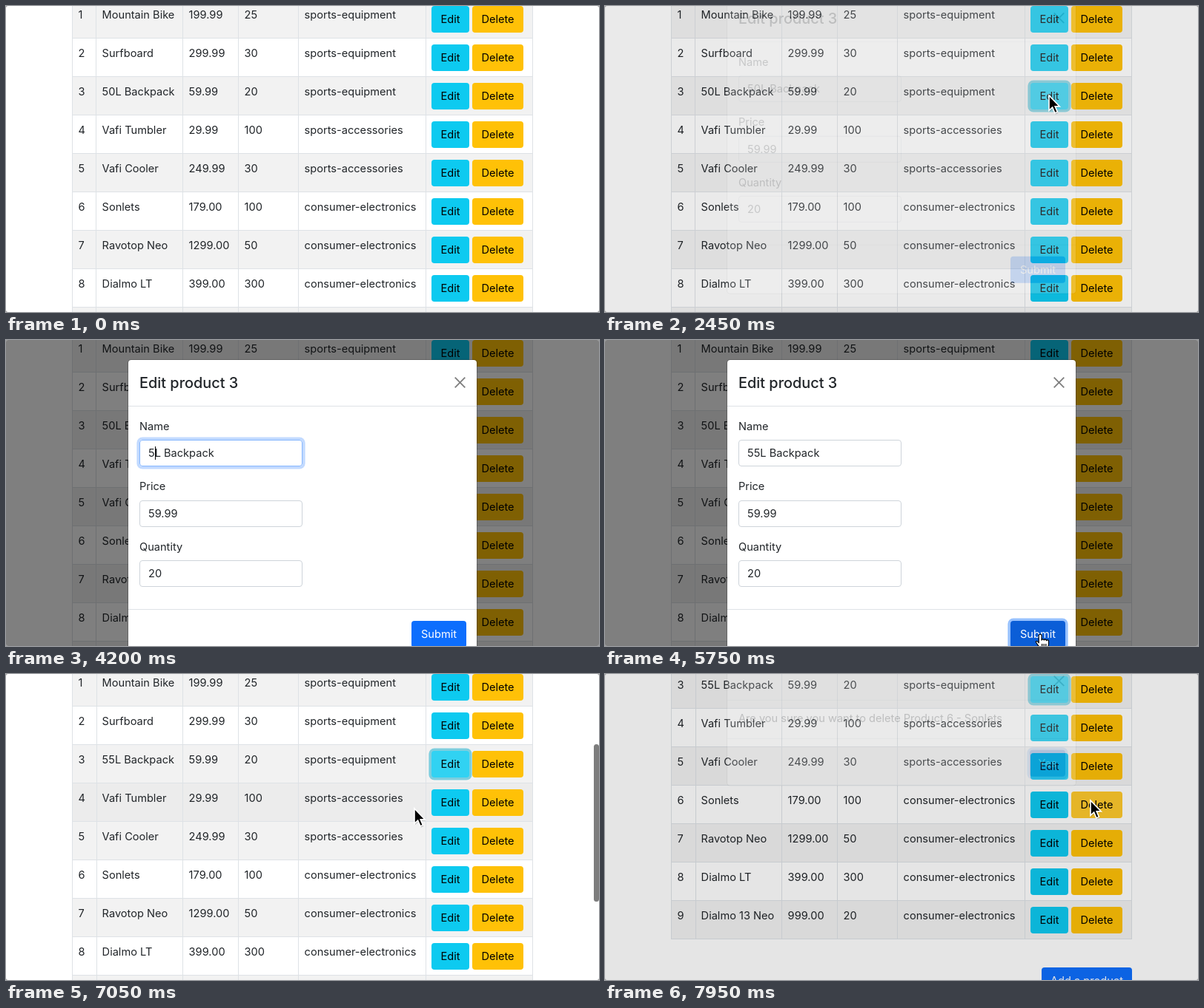
An HTML page for the animation above (8000 ms loop, 800 by 414 pixels).

```html
<!DOCTYPE html>
<html lang="en">
<head>
<meta charset="utf-8">
<title>Product table</title>
<style>
  html, body { margin: 0; width: 100%; height: 100%; overflow: hidden; background: #999; }
  * { box-sizing: border-box; }
  #stage {
    position: relative; width: 800px; height: 414px; overflow: hidden;
    background: #fff; color: #212529; border-radius: 3px;
    font: 14.6px/20px Inter, Roboto, sans-serif; white-space: nowrap;
  }
  #stage div, svg { position: absolute; }
  #page { left: 0; top: 0; width: 800px; height: 600px; --first: 32px; }
  #rows { left: 0; top: 0; }

  #page .row {
    left: 89px; width: 622px; height: 52px; display: grid;
    grid-template-columns: var(--first) calc(149px - var(--first)) 75px 81px 172px 145px;
    border-bottom: 1px solid #dee2e6; line-height: 40px;
  }
  .row:nth-child(odd) { background: #f2f2f2; }
  #page .row.hover { background: #ececec; }
  .row span { border-left: 1px solid #dee2e6; padding-left: 7.6px; }
  .row span:nth-child(2) { padding-left: calc(39.6px - var(--first)); }
  .row span:nth-child(6) { border-right: 1px solid #dee2e6; }

  .btn { height: 36px; border-radius: 4px; text-align: center; line-height: 36px; color: #000; }
  .edit { left: 485px; top: 8px; width: 51px; background: #0dcaf0; }
  .edit.hover, .edit.focus { background: #31d2f2; }
  .edit.focus { box-shadow: 0 0 0 3.6px rgba(11, 172, 204, .5); }
  .delete { left: 540px; top: 8px; width: 69px; background: #ffc107; }
  .delete.hover { background: #ffca2c; }
  .primary { background: #0d6efd; color: #fff; }
  .primary.hover, .primary.focus { background: #0b5ed7; }
  .primary.focus { box-shadow: 0 0 0 3.6px rgba(49, 132, 253, .5); }
  #add { left: 589px; top: 498px; width: 122px; }

  #thumb { left: 793px; width: 7px; height: 213px; border-radius: 4px; background: #7d7d7d; }
  #shade { inset: 0; background: #000; }
  .dialog {
    left: 164px; width: 472px; background: #fff; background-clip: padding-box;
    border: 1px solid rgba(0, 0, 0, .2); border-radius: 5px;
  }
  #editor { top: 26px; height: 405px; }
  #confirm { top: 23px; height: 169px; }
  .line { left: 0; right: 0; height: 1px; background: #dee2e6; }
  .title { left: 15px; top: 16px; font-size: 19.9px; font-weight: 500; line-height: 30px; }
  .label { left: 15px; }
  .input {
    left: 15px; width: 220px; height: 36px; padding-left: 11px; line-height: 34px;
    border: 1px solid #ced4da; border-radius: 4px;
  }
  .close { left: 440px; width: 15px; height: 15px; stroke: #000; stroke-width: 1.8; opacity: .5; }
  #caret { display: inline-block; width: 1px; height: 18px; margin-right: -1px; vertical-align: -4px; background: #000; }
  #pointer { left: 0; top: 0; width: 30px; height: 34px; overflow: visible; }
</style>
</head>
<body>
<div id="stage">
  <div id="page">
    <div id="rows"></div>
    <div id="add" class="btn primary">Add a product</div>
  </div>
  <div id="thumb"></div>
  <div id="shade"></div>

  <div id="editor" class="dialog">
    <div class="title">Edit product 3</div>
    <svg class="close" style="top:23px" viewBox="0 0 15 15"><path d="M.7 .7L14.3 14.3M14.3 .7L.7 14.3"/></svg>
    <div class="line" style="top:62px"></div>
    <div class="label" style="top:80px">Name</div>
    <div id="name" class="input" style="top:108px"><span id="typed">50</span><i id="caret"></i>L Backpack</div>
    <div class="label" style="top:161px">Price</div>
    <div class="input" style="top:189.5px">59.99</div>
    <div class="label" style="top:242.5px">Quantity</div>
    <div class="input" style="top:271px">20</div>
    <div class="line" style="top:337px"></div>
    <div id="submit" class="btn primary" style="left:382px; top:353px; width:74px">Submit</div>
  </div>

  <div id="confirm" class="dialog">
    <svg class="close" style="top:18px" viewBox="0 0 15 15"><path d="M.7 .7L14.3 14.3M14.3 .7L.7 14.3"/></svg>
    <div class="line" style="top:51px"></div>
    <div class="label" style="top:66px">Are you sure you want to delete Product 6 - Sonlets</div>
    <div class="line" style="top:103px"></div>
    <div class="btn primary focus" style="left:408px; top:119px; width:48px">Yes</div>
  </div>

  <svg id="pointer" viewBox="0 0 30 34">
    <g id="arrow">
      <path d="M1 2.5V22L5.6 17.8L8.9 25.4L12.4 24L9.2 16.5H15.3Z" fill="#000" opacity=".2"/>
      <path d="M0 0V20.4L4.6 16.2L7.9 23.8L11.4 22.4L8.2 14.9H14.3Z" stroke="#fff" stroke-width="1.6"/>
    </g>
    <g id="hand" transform="translate(-7 -1.4)" stroke="#000" stroke-width="1.2" stroke-linejoin="round">
      <path fill="#fff" d="M5.2 13.2V3.4a1.9 1.9 0 0 1 3.8 0V9.6a1.7 1.7 0 0 1 3.3-.2a1.7 1.7 0 0 1 3.2.7a1.6 1.6 0 0 1 3 .9v4c0 3-1.8 4.2-1.8 7H7.6c-.6-2.5-2.6-4.2-4.4-6.9S.6 11.6 2 11s2.2.9 3.2 2.2z"/>
      <path d="M9.6 14.5v4.5M12.2 14.5v4.5M14.8 14.5v4.5"/>
    </g>
    <g id="beam" fill="none">
      <path d="M-3 -8.5Q0 -8.5 0 -6.5Q0 -8.5 3 -8.5M0 -6.5V6.5M-3 8.5Q0 8.5 0 6.5Q0 8.5 3 8.5" stroke="#000" stroke-width="1.2"/>
    </g>
  </svg>
</div>

<script>
const LOOP = 8000, STEP = 50;
const $ = id => document.getElementById(id);
const clamp = v => Math.min(1, Math.max(0, v));
const ramp = (t, start, length) => clamp((t - start) / length);
const easeOut = x => 1 - (1 - x) ** 1.5;
const smooth = x => x * x * (3 - 2 * x);
const within = (v, a, b) => v >= a && v < b;

const products = [
  ['Mountain Bike', '199.99', 25, 'sports-equipment'],
  ['Surfboard', '299.99', 30, 'sports-equipment'],
  ['50L Backpack', '59.99', 20, 'sports-equipment'],
  ['Vafi Tumbler', '29.99', 100, 'sports-accessories'],
  ['Vafi Cooler', '249.99', 30, 'sports-accessories'],
  ['Sonlets', '179.00', 100, 'consumer-electronics'],
  ['Ravotop Neo', '1299.00', 50, 'consumer-electronics'],
  ['Dialmo LT', '399.00', 300, 'consumer-electronics'],
  ['Dialmo 13 Neo', '999.00', 20, 'consumer-electronics']
];

$('rows').innerHTML = products.map((cells, i) =>
  `<div class="row" style="top:${52 * i - 8}px">` +
  [i + 1, ...cells, ''].map(c => `<span>${c}</span>`).join('') +
  '<div class="btn edit">Edit</div><div class="btn delete">Delete</div></div>').join('');
const rows = [...$('rows').children];
const edits = rows.map(r => r.querySelector('.edit'));
const deletes = rows.map(r => r.querySelector('.delete'));
const backpack = rows[2].children[1];

// Pointer path: time, x, y, shape from then on
const path = [
  [0, 140, 445, 'arrow'], [300, 420, 330, 'arrow'], [600, 725, 250, 'arrow'], [850, 715, 225, 'arrow'],
  [1150, 634, 170, 'arrow'], [1300, 634, 165, 'arrow'], [1400, 615, 141, 'arrow'], [1700, 599, 121, 'arrow'],
  [2800, 599, 121, 'arrow'], [2950, 290, 150, 'beam'], [3100, 290, 150, 'beam'], [3400, 216, 156, 'beam'],
  [4200, 216, 156, ''], [4600, 216, 156, 'beam'], [4750, 270, 195, 'arrow'], [5250, 583, 388, 'hand'],
  [5350, 587, 398, 'hand'], [6250, 587, 398, 'hand'], [6300, 590, 372, 'hand'], [6350, 595, 276, 'hand'],
  [6450, 602, 130, 'hand'], [6600, 602, 130, 'hand'], [6700, 570, 165, 'arrow'], [6850, 551, 182, 'arrow'],
  [7400, 551, 182, 'arrow'], [7800, 655, 171, 'hand'], [7900, 655, 171, 'arrow'], [LOOP, 655, 171, 'arrow']
];

function pointerAt(t) {
  const i = path.findIndex(p => p[0] > t) - 1;
  const [t0, x0, y0, shape] = path[i], [t1, x1, y1] = path[i + 1];
  const k = smooth((t - t0) / (t1 - t0));
  return { x: x0 + (x1 - x0) * k, y: y0 + (y1 - y0) * k, shape };
}

const scrollAt = t => 101 * easeOut(ramp(t, 7050, 230));

// Row and button under the pointer; a scroll alone does not refresh it
function hoverAt(t) {
  if (!within(t, 6250, 7920)) return {};
  const { x, y } = pointerAt(t);
  const py = y + 8 + (t < 7400 ? 0 : scrollAt(t));
  const onButton = within(py % 52, 8, 44);
  return {
    row: Math.floor(py / 52),
    edit: onButton && within(x, 574, 625),
    remove: onButton && within(x, 629, 698)
  };
}

function showDialog(el, t, start, end) {
  const open = t < end;
  const fade = open ? ramp(t, start, 150) : 1 - ramp(t, end, 150);
  const slide = open ? 1 - easeOut(ramp(t, start, 300)) : easeOut(ramp(t, end, 300));
  el.style.opacity = fade;
  el.style.transform = `translateY(${-47 * slide}px)`;
  return fade;
}

function draw(t) {
  const scroll = scrollAt(t), saved = t >= 5850;
  $('page').style.transform = `translateY(${-scroll}px)`;
  $('page').style.setProperty('--first', saved ? '33px' : '32px');
  backpack.textContent = saved ? '55L Backpack' : '50L Backpack';

  const hover = hoverAt(t), late = hoverAt(t - STEP);
  rows.forEach((row, i) => {
    row.classList.toggle('hover', i === hover.row);
    edits[i].classList.toggle('hover', i === late.row && late.edit);
    deletes[i].classList.toggle('hover', i === late.row && late.remove);
  });
  edits[2].classList.toggle('focus', t >= 2400);

  $('thumb').style.top = 95 + scroll * 213 / 414 + 'px';
  $('thumb').style.opacity = t < 7050 ? 0 : 1 - ramp(t, 7600, 200);

  const shown = showDialog($('editor'), t, 2425, 5830) + showDialog($('confirm'), t, 7920, LOOP);
  $('shade').style.opacity = shown / 2;

  $('typed').textContent = t < 4200 ? '50' : t < 4550 ? '5' : '55';
  $('caret').style.opacity = +(within(t, 3550, 3900) || within(t, 4200, 5050));
  const ring = ramp(t, 3520, 150) - ramp(t, 5580, 150);
  $('name').style.boxShadow = `0 0 0 3.6px rgba(13, 110, 253, ${ring / 4})`;
  $('name').style.borderColor = ring > .5 ? '#86b7fe' : '';
  $('submit').classList.toggle('hover', t >= 5250);
  $('submit').classList.toggle('focus', t >= 5600);

  const p = pointerAt(t);
  $('pointer').style.transform = `translate(${p.x}px, ${p.y}px)`;
  for (const shape of ['arrow', 'hand', 'beam'])
    $(shape).style.display = shape === p.shape ? '' : 'none';
}

let begin;
function tick(now) {
  begin ??= now;
  const t = (now - begin) % LOOP;
  draw(Math.floor(t / STEP) * STEP);
  requestAnimationFrame(tick);
}
draw(0);
requestAnimationFrame(tick);
</script>
</body>
</html>
```
